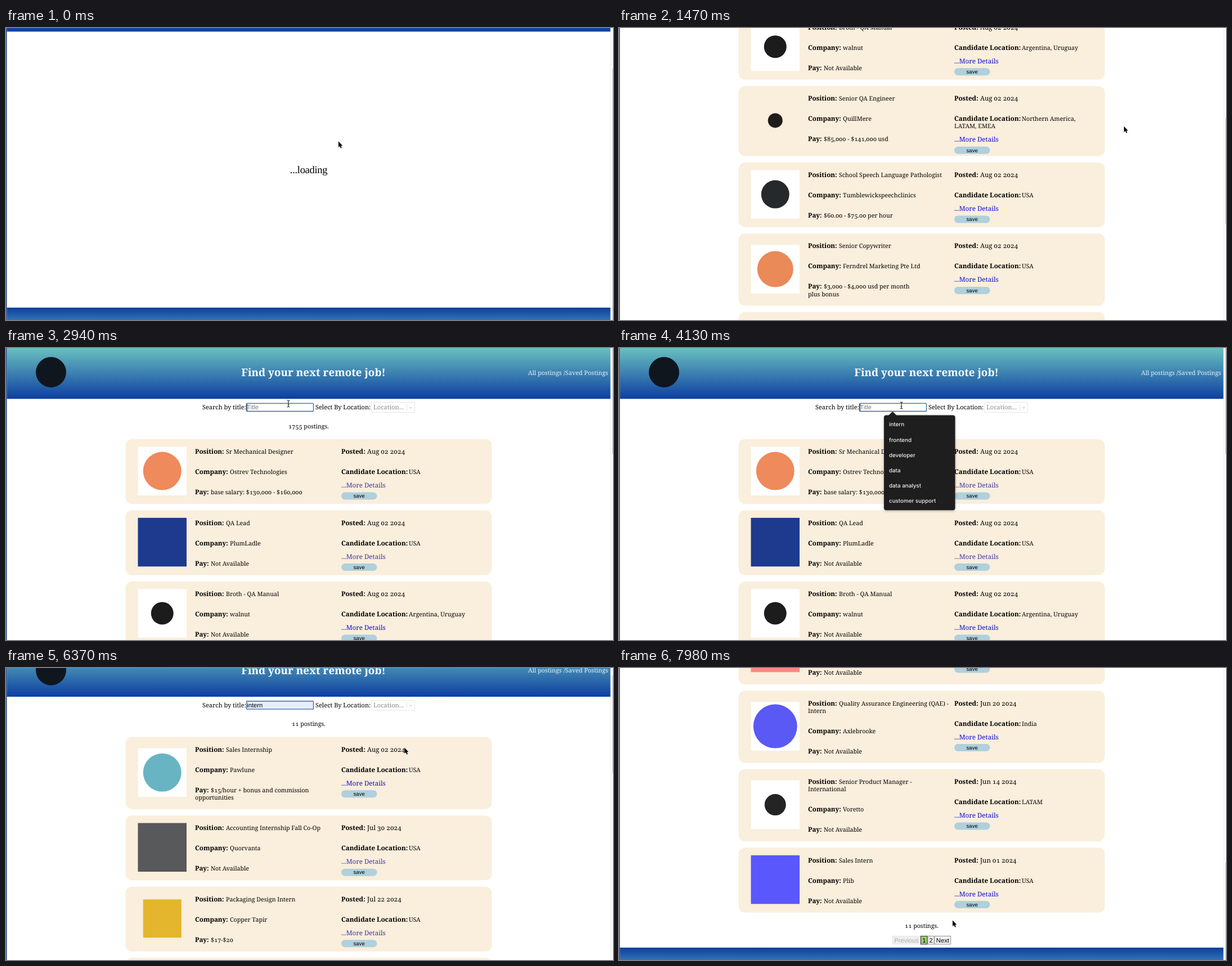
Write an HTML page that moves like this. It is 1079 px wide and 519 px high and loops after 8000 ms.

```html
<!DOCTYPE html>
<html lang="en">
<head>
<meta charset="utf-8">
<title>Remote job search</title>
<style>
  html, body { margin: 0; width: 100%; height: 100%; overflow: hidden; background: #fff; }
  svg { display: block; width: 1079px; height: 519px; }
  text { font: 10.65px "Noto Serif", serif; font-variant-numeric: oldstyle-nums; text-rendering: geometricPrecision; white-space: pre; }
  .label { font-size: 11.65px; font-weight: 700; }
  .date { font-size: 11.5px; }
  .link { font-size: 11.6px; fill: #0c0cd0; }
  .visited { fill: #3c36a2; }
  .title { font-size: 18.8px; font-weight: 700; fill: #fff; }
  .nav { font-size: 10.85px; fill: #e9f0f7; }
  .form { font-size: 11px; }
  .ui { font: 11.2px "Liberation Sans", Arial, sans-serif; }
  .save { font-size: 9.6px; }
  .option { font: 500 9.8px Inter, sans-serif; fill: #f1f1f1; }
  .loading { font: 18.5px "Liberation Serif", serif; letter-spacing: -.3px; }
  .mid { text-anchor: middle; }
</style>
</head>
<body>
<svg id="stage" viewBox="0 0 1079 519"></svg>
<script>
const DURATION = 8000, STEP = 70, VIEW = 519;
const FIRST_CARD = 162, GAP = 11.5;

const rect = (x, y, w, h, fill, more = '') =>
  `<rect x="${x}" y="${y}" width="${w}" height="${h}" fill="${fill}" ${more}/>`;
const text = (x, y, content, cls = '', more = '') =>
  `<text x="${x}" y="${y}" class="${cls}" ${more}>${content}</text>`;
const dot = (color, r) => ({ color, r, tile: '#fff' });
const tile = color => ({ tile: color });

const jobs = [
  { pos: 'Sr Mechanical Designer', firm: 'Ostrev Technologies', pay: 'base salary: $130,000 - $160,000', date: 'Aug 02 2024', place: 'USA', mark: dot('#ee8a5b', 34), seen: true },
  { pos: 'QA Lead', firm: 'PlumLadle', date: 'Aug 02 2024', place: 'USA', mark: tile('#1d3a8f'), seen: true },
  { pos: 'Broth - QA Manual', firm: 'walnut', date: 'Aug 02 2024', place: 'Argentina, Uruguay', mark: dot('#1c1c1c', 20) },
  { pos: 'Senior QA Engineer', firm: 'QuillMere', pay: '$85,000 - $141,000 usd', date: 'Aug 02 2024', place: 'Northern America,|LATAM, EMEA', mark: { color: '#1f1c1a', r: 13 } },
  { pos: 'School Speech Language Pathologist', firm: 'Tumblewickspeechclinics', pay: '$60.00 - $75.00 per hour', date: 'Aug 02 2024', place: 'USA', mark: dot('#26292b', 25) },
  { pos: 'Senior Copywriter', firm: 'Ferndrel Marketing Pte Ltd', pay: '$3,000 - $4,000 usd per month|plus bonus', date: 'Aug 02 2024', place: 'USA', mark: dot('#ea8a58', 32) },
  { pos: 'Data Engineer', firm: 'Oakspindle', date: 'Aug 02 2024', place: 'USA', mark: dot('#3c78b4', 30) },
  { pos: 'Support Specialist', firm: 'Brindlewop', date: 'Aug 01 2024', place: 'Canada', mark: dot('#5a9a6a', 30) },
];

const internJobs = [
  { pos: 'Sales Internship', firm: 'Pawlune', pay: '$15/hour + bonus and commission|opportunities', date: 'Aug 02 2024', place: 'USA', mark: dot('#69b4c2', 34) },
  { pos: 'Accounting Internship Fall Co-Op', firm: 'Quorvanta', date: 'Jul 30 2024', place: 'USA', mark: tile('#58595b'), seen: true },
  { pos: 'Packaging Design Intern', firm: 'Copper Tapir', pay: '$17-$20', date: 'Jul 22 2024', place: 'USA', mark: { color: '#e3b62d', square: 68 }, seen: true },
  { pos: 'Marketing Intern', firm: 'Oakspindle', date: 'Jul 18 2024', place: 'USA', mark: dot('#3c78b4', 30) },
  { pos: 'Software Intern', firm: 'Brindlewop', date: 'Jul 11 2024', place: 'USA', mark: dot('#5a9a6a', 30) },
  { pos: 'Internal Tools Engineer', firm: 'Fenquill', date: 'Jul 02 2024', place: 'Canada', mark: dot('#9a6ab4', 30) },
  { pos: 'Associate, International Compliance|(Contract)', firm: 'RowMoose', date: 'Jun 27 2024', place: 'UK', mark: tile('#fb8880') },
  { pos: 'Quality Assurance Engineering (QAE) -|Intern', firm: 'Axlebrooke', date: 'Jun 20 2024', place: 'India', mark: dot('#5b59f6', 39) },
  { pos: 'Senior Product Manager -|International', firm: 'Voretto', date: 'Jun 14 2024', place: 'LATAM', mark: dot('#242424', 19) },
  { pos: 'Sales Intern', firm: 'Plib', date: 'Jun 01 2024', place: 'USA', mark: tile('#5a57fc') },
];

// A labelled value; "|" starts a second line under the label.
function field(x, valueX, y, label, value, cls = '') {
  const [first, second] = value.split('|');
  return text(x, y, label, 'label') + text(valueX, y, first, cls) + (second ? text(x, y + 13.2, second) : '');
}

function logo({ color, r, square, tile }, h) {
  const x = 234.5, size = 86.5, y = (h - size) / 2 - .9, cx = x + size / 2, cy = y + size / 2;
  return (tile ? rect(x, y, size, size, tile) : '')
    + (r ? `<circle cx="${cx}" cy="${cy}" r="${r}" fill="${color}"/>` : '')
    + (square ? rect(cx - square / 2, cy - square / 2, square, square, color) : '');
}

function card(job, top) {
  const { pos, firm, pay = 'Not Available', date, place, mark, seen } = job;
  const wraps = s => s.includes('|');
  const drop = wraps(pos) ? 13 : 0, push = wraps(place) ? 13.2 : 0;
  const h = drop || wraps(pay) ? 128 : push ? 124.3 : 115;
  const svg = `<g transform="translate(0 ${top})">`
    + rect(212.5, 0, 651, h, '#faeedc', 'rx="11.5"') + logo(mark, h)
    + field(336, 391, 26, 'Position:', pos)
    + field(336, 398, 62 + drop, 'Company:', firm)
    + field(336, 364, 98 + drop, 'Pay:', pay)
    + field(596, 642, 26, 'Posted:', date, 'date')
    + field(596, 716, 62, 'Candidate Location:', place)
    + text(596, 86 + push, '...More Details', 'link' + (seen ? ' visited' : ''))
    + rect(596, 94.5 + push, 63.5, 13, '#afd0dc', 'rx="6.5"')
    + text(627.7, 104.3 + push, 'save', 'ui save mid') + '</g>';
  return { svg, h };
}

function list(id, items, count) {
  let y = FIRST_CARD, svg = text(538, 142.6, `${count} postings.`, 'mid');
  for (const job of items) {
    const { svg: part, h } = card(job, y);
    svg += part;
    y += h + GAP;
  }
  return { svg: `<g id="${id}">${svg}`, end: y - GAP };
}

const footer = y => rect(1.5, y, 1073, 22, 'url(#foot)');

function pager(end) {
  const button = (x, w, label, fill, edge, ink = '#000') =>
    rect(x, end + 42, w, 14.5, fill, `stroke="${edge}" stroke-width=".9"`)
    + text(x + w / 2, end + 53, label, 'ui mid', `fill="${ink}"`);
  return text(538, end + 27.8, '11 postings.', 'mid')
    + button(486, 50, 'Previous', '#efefef', '#e6e6e6', '#adadad')
    + button(536.5, 11.5, '1', '#9bcb72', '#222')
    + button(549, 11, '2', '#f3f3f3', '#888')
    + button(561, 28.7, 'Next', '#f3f3f3', '#888')
    + footer(end + 62.5);
}

const allList = list('all', jobs, 1755);
const internList = list('interns', internJobs, 11);
const internHeight = internList.end + 84.5;

const options = ['intern', 'frontend', 'developer', 'data', 'data analyst', 'customer support'];

const header = rect(1.5, 0, 1073, 90.4, 'url(#head)')
  + '<circle cx="80" cy="43" r="27" fill="#10161e"/>'
  + text(546.5, 50, 'Find your next remote job!', 'title mid')
  + text(928, 47.5, 'All postings', 'nav') + text(991, 47.5, '/Saved Postings', 'nav');

const form = '<g id="form">' + text(349, 109.2, 'Search by title:', 'form')
  + '<path id="underline" d="M427.5 112.5H546.5" stroke="#666" stroke-width="1"/>'
  + rect(427.5, 98.3, 119, 14.2, '#fff', 'id="box" rx="1" stroke="#37699f" stroke-width="1.3"')
  + text(428.3, 109.3, '', 'ui', 'id="value"')
  + '<path id="caret" d="M428.6 99.5V111.5" stroke="#111" stroke-width=".9"/>'
  + text(550, 109.2, 'Select By Location:', 'form')
  + rect(649.5, 96.5, 77, 18, '#fff', 'rx="1.5" stroke="#e4e4e4" stroke-width=".9"')
  + text(653, 109.2, 'Location...', 'form', 'fill="#8c8c8c"')
  + '<path d="M712.5 99.7V111.5" stroke="#ddd" stroke-width=".8"/>'
  + '<path d="M717 104.8L719.3 107L721.6 104.8" fill="none" stroke="#ccc" stroke-width="1.1"/></g>';

const popup = '<g id="popup" style="filter:drop-shadow(0 1px 2px #0005)">'
  + '<path d="M479 120L486.3 113L493.6 120Z" fill="#1e1e1e"/>'
  + rect(471, 119.5, 126.5, 168.7, '#1e1e1e', 'rx="4"')
  + rect(474.5, 123.5, 119.5, 25, '#2762c4', 'id="highlight" rx="3"')
  + options.map((o, i) => text(480, 139.4 + i * 27.2, o, 'option')).join('') + '</g>';

const gradient = (id, stops) => `<linearGradient id="${id}" x2="0" y2="1">`
  + stops.map((c, i) => `<stop offset="${i / (stops.length - 1)}" stop-color="${c}"/>`).join('') + '</linearGradient>';

const byId = id => document.getElementById(id);
byId('stage').innerHTML = '<defs>'
  + gradient('head', ['#68bfc0', '#3c80b0', '#0c3ea0']) + gradient('foot', ['#0c3ea0', '#3272b2']) + '</defs>'
  + rect(0, 0, 1079, VIEW, '#fff')
  + '<g id="page">' + header
  + `<g id="loading">${text(538, 342, '...loading', 'loading mid')}${footer(581)}</g>`
  + form + allList.svg + '</g>' + internList.svg + pager(internList.end) + '</g>' + popup + '</g>'
  + rect(0, 0, 1.5, VIEW, '#2a4a80')
  + rect(1075, 0, 4, VIEW, '#fcfcfc') + rect(1074.7, 0, .8, VIEW, '#e8e8e8')
  + rect(1078, 0, 1, 1, '#bdbdbd', 'id="thumb"')
  + '<g id="pointer"><path id="arrow" d="M0 -.5V10L2.4 7.9L4.1 11.7L5.8 11L4.3 7.3H7.3Z" stroke="#fff" stroke-width="1.2" paint-order="stroke"/>'
  + '<path id="beam" d="M-2.5 -6Q0 -6 0 -4.5Q0 -6 2.5 -6M0 -5V5M-2.5 6Q0 6 0 4.5Q0 6 2.5 6M-1.3 1.8H1.3" fill="none" stroke="#111" stroke-width="1"/></g>';

const scrollPath = [
  [70, 84], [560, 120], [700, 120], [1120, 355], [1540, 455], [1680, 465], [1820, 465],
  [1890, 380], [1960, 160], [2030, 36.4], [2170, 0], [5950, 0], [6370, 39.3], [6580, 120],
  [6790, 120], [6860, 480], [6930, 800], [7000, 959.5], [7070, 1008], [7140, 1028], [7210, internHeight - VIEW],
];
const pointerPath = [
  [0, 591, 202], [560, 897, 177], [2030, 898, 174], [2380, 532, 147], [2450, 532, 147], [2730, 502, 97],
  [2800, 502, 97], [3150, 502, 102], [4340, 502, 102], [4410, 503, 96], [4550, 506, 104], [4760, 512, 121],
  [4830, 512, 121], [5040, 512, 128], [5600, 512, 128], [5880, 708, 142], [7560, 709, 142], [7980, 593, 449],
];

function along(path, t) {
  const i = path.findIndex(p => p[0] > t);
  if (i === 0) return path[0].slice(1);
  if (i < 0) return path[path.length - 1].slice(1);
  const a = path[i - 1], b = path[i], k = (t - a[0]) / (b[0] - a[0]);
  return a.slice(1).map((v, n) => v + (b[n + 1] - v) * k);
}

const show = (id, on) => byId(id).style.display = on ? '' : 'none';

function draw(t) {
  const loading = t < 70, filtered = t >= 5180, focused = t >= 2870, filled = t >= 4900;
  const [scroll] = along(scrollPath, t), [x, y] = along(pointerPath, t);
  const height = loading ? 603 : filtered ? internHeight : 1425;

  byId('page').setAttribute('transform', `translate(0 ${-scroll})`);
  show('loading', loading);
  show('form', !loading);
  show('all', !loading && !filtered);
  show('interns', filtered);

  show('box', focused);
  show('underline', !focused);
  byId('box').setAttribute('fill', filled ? '#e6eefc' : '#fff');
  byId('value').textContent = filled ? 'intern' : 'Title';
  byId('value').setAttribute('fill', filled ? '#000' : '#7d7d7d');
  show('caret', focused && !filled && (t < 3640 || (t >= 4130 && t < 4620)));

  show('popup', t >= 3290 && t < 5040);
  byId('popup').style.opacity = t < 3360 ? .6 : 1;
  show('highlight', filled);

  byId('thumb').setAttribute('y', scroll / height * VIEW);
  byId('thumb').setAttribute('height', VIEW * VIEW / height);

  const beam = t >= 2590 && t < 4690;
  show('beam', beam);
  show('arrow', !beam);
  byId('pointer').setAttribute('transform', `translate(${x} ${y})`);
}

const start = performance.now();
function tick() {
  const t = (performance.now() - start) % DURATION;
  draw(Math.floor(t / STEP) * STEP);
  requestAnimationFrame(tick);
}
tick();
</script>
</body>
</html>
```
